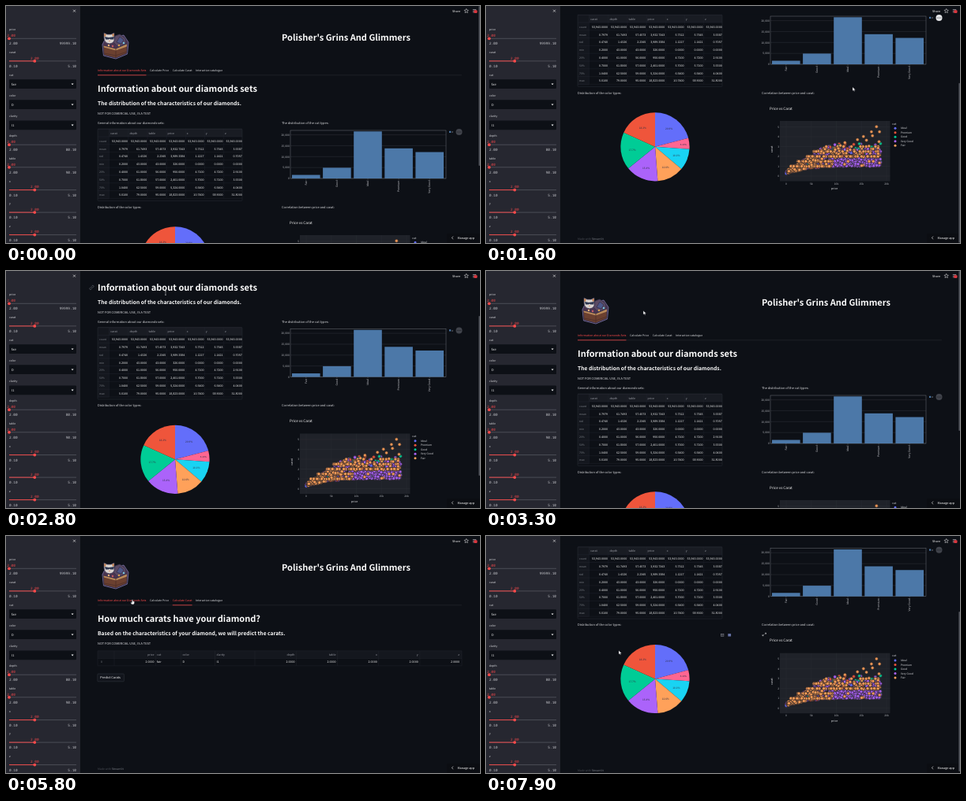
An HTML page for the animation above (8000 ms loop, 600x301 px).

```html
<!DOCTYPE html>
<html lang="en">
<head>
<meta charset="utf-8">
<title>Diamond dashboard</title>
<style>
html, body { margin: 0; width: 100%; height: 100%; overflow: hidden; background: #0d1016; }
svg { display: block; width: 600px; height: 301px; }
text { font-family: "Noto Sans CJK JP", "Noto Sans CJK SC", "Noto Sans CJK", "Open Sans", sans-serif; text-rendering: geometricPrecision; white-space: pre; }
.mono { font-family: "Noto Sans Mono", "DejaVu Sans Mono", monospace; }
</style>
</head>
<body>
<svg id="stage" viewBox="0 0 600 301"></svg>
<script>
const BG = '#0d1016', PANEL = '#262730', RED = '#ff4b4b', WHITE = '#fafafa', SOFT = '#dcdde0', DIM = '#7d8088', EDGE = '#2b2e36';
const stage = document.getElementById('stage');

// Markup helpers
const text = (x, y, s, size = 3.95, fill = SOFT, extra = '') =>
  `<text x="${x}" y="${y}" font-size="${size}" fill="${fill}" ${extra}>${s}</text>`;
const END = 'text-anchor="end"', MID = 'text-anchor="middle"', BOLD = 'font-weight="700"';
const rect = (x, y, w, h, fill, extra = '') =>
  `<rect x="${x}" y="${y}" width="${w}" height="${h}" fill="${fill}" ${extra}/>`;
const line = (x1, y1, x2, y2, color, w = .4) =>
  `<path d="M${x1} ${y1}L${x2} ${y2}" stroke="${color}" stroke-width="${w}"/>`;
const dot = (x, y, r, fill, extra = '') => `<circle cx="${x}" cy="${y}" r="${r}" fill="${fill}" ${extra}/>`;
const path = (d, fill, extra = '') => `<path d="${d}" fill="${fill}" ${extra}/>`;
const group = (id, body, extra = '') => `<g id="${id}" ${extra}>${body}</g>`;

function slider(y, label, value, pos, min, max) {
  const mono = (x, dy, s, fill, anchor = '') => text(x, y + dy, s, 4.45, fill, `class="mono" ${anchor}`);
  const x = 4 + 85 * pos;
  return text(4, y + 1.4, label, 3.5) +
    mono(Math.max(x, 6.6), 9, value, '#e5474a', MID) +
    line(4, y + 11.3, 89, y + 11.3, '#50525b', .9) + line(4, y + 11.3, x, y + 11.3, RED, .9) + dot(x, y + 11.3, 1.9, RED) +
    mono(4, 19.4, min, '#c3c4c9') + mono(89, 19.4, max, '#c3c4c9', END);
}

function select(y, label, value) {
  return text(4, y + 1.4, label, 3.5) + rect(4, y + 6, 85, 11.8, BG, 'rx="1.2"') +
    text(7, y + 13.4, value, 3.95, WHITE) + path(`M82.6 ${y + 11.2}h3l-1.5 1.8z`, WHITE);
}

function sidebar() {
  return rect(0, 0, 94, 301, PANEL) +
    path('M85 4.7l3 3m0-3l-3 3', 'none', 'stroke="#fafafa" stroke-width=".6"') +
    slider(30, 'price', '2.00', 0, '2.00', '99999.10') +
    slider(58.6, 'carat', '2.00', .38, '0.10', '5.10') +
    select(87.2, 'cut', 'fair') + select(113.3, 'color', 'D') + select(139.4, 'clarity', 'I1') +
    slider(164.9, 'depth', '2.00', 0, '2.00', '80.10') +
    slider(193.5, 'table', '2.00', 0, '2.00', '90.10') +
    ['x', 'y', 'z'].map((s, i) => slider(222.3 + 28.5 * i, s, '2.00', .38, '0.10', '5.10')).join('');
}

// A masked animal leaning over a treasure chest
function emblem() {
  const ink = 'stroke="#38334f" stroke-width=".8" stroke-linejoin="round"';
  return path('M122 49L125 43 149 37 155 46 153.500 61 139 67 123.500 63z', '#4a3550', 'stroke="#6b6592" stroke-width="1"') +
    path('M136 46l2-8 6-2 7 5 1 7-10 4z', '#5a4a63', ink) +
    path('M123 50l16 4 14-6v12l-14 6-15-4z', '#6b4030', ink) +
    path('M123.500 50.500l15.500 4 14-6v3l-14 5-15-4z', '#b98a5c') +
    path('M139 54v12M124 60l15 3 14-5', 'none', 'stroke="#4a2c28" stroke-width=".7"') +
    path('M124 40l0-6 4 2h5l4-2v7q1 6-6 7-7-1-7-8z', '#d9d3cf', ink) +
    path('M124 35l3 1-2 4zM137 35l-3 1 2 4z', '#c07a48') +
    path('M125 39l5 1 7-1-1 3.500-4 0-1-1-1 1-4 0z', '#2d3650') +
    dot(131, 44.500, .8, '#d88c6c') +
    path('M140 46l4-7 5 4-3 5z', '#4d5788', ink) +
    [[143, 50, '#d9a04a'], [149, 47, '#72c5de'], [130, 50, '#e5b27a'], [135, 51, '#c55d66']].map(g => dot(g[0], g[1], 1.2, g[2])).join('');
}

const tabs = [[116, 177.5, 'Information about our Diamonds Sets'], [182, 206.3, 'Calculate Price'],
  [210.8, 235.6, 'Calculate Carat'], [240, 274, 'Interactive catalogue']];

function masthead() {
  return emblem() + text(349, 43.5, "Polisher's Grins And Glimmers", 11, WHITE, BOLD) +
    line(116, 87.8, 577, 87.8, '#33363e', .4) +
    tabs.map((b, i) => text(b[0], 82.7, b[2], 3.5, SOFT, `id="tab${i}"`)).join('') +
    rect(116, 87.5, 61.5, .7, RED, 'id="marker"');
}

const intro = (title, sub) => text(116, 109, title, 11.02, WHITE, BOLD) + text(116, 126.4, sub, 6.73, WHITE, BOLD) +
  text(116, 138, 'NOT FOR COMERCIAL USE, IS A TEST', 4);
const footer = y => text(116, y, 'Made with <tspan fill="#7b7e86">Streamlit</tspan>', 3.5, '#4b4e56');

const stats = `count 53,943.0000 53,943.0000 53,943.0000 53,943.0000 53,943.0000 53,943.0000 53,943.0000
mean 0.7979 61.7493 57.4573 3,932.7343 5.7312 5.7345 3.5387
std 0.4740 1.4326 2.2345 3,989.3384 1.1217 1.1421 0.7057
min 0.2000 43.0000 43.0000 326.0000 0.0000 0.0000 0.0000
25% 0.4000 61.0000 56.0000 950.0000 4.7100 4.7200 2.9100
50% 0.7000 61.8000 57.0000 2,401.0000 5.7000 5.7100 3.5300
75% 1.0400 62.5000 59.0000 5,324.0000 6.5400 6.5400 4.0400
max 5.0100 79.0000 95.0000 18,823.0000 10.7400 58.9000 31.8000`;

function statsTable() {
  const step = 9.8, top = 156.2;
  let s = rect(116, top, 183, step, '#191c23') + rect(116, top, 14.5, 9 * step + 1, '#14171e');
  for (let i = 0; i <= 9; i++) s += line(116, top + i * step, 299, top + i * step, EDGE, .3);
  for (let i = 0; i < 7; i++) s += line(130.6 + 24.2 * i, top, 130.6 + 24.2 * i, top + 9 * step, EDGE, .3);
  s += rect(116, top, 183, 9 * step + 3, 'none', `rx="1" stroke="${EDGE}" stroke-width=".5"`);
  ['carat', 'depth', 'table', 'price', 'x', 'y', 'z'].forEach((h, i) => s += text(132.3 + 24.1 * i, 162.8, h, 3.6, '#9a9ca4'));
  stats.split('\n').forEach((row, r) => row.split(' ').forEach((v, c) =>
    s += text(c ? 130 + 24.1 * c : 118, 172.7 + step * r, v, c ? 3.65 : 3.4, c ? WHITE : DIM, c ? END : '')));
  return s;
}

function barChart() {
  const base = 219;
  let s = text(349, 150, 'The distribution of the cut types:');
  for (let i = 0; i < 5; i++) {
    const y = base - 13.85 * i;
    s += line(360, y, 557, y, '#3f424a', .35) + text(358.8, y + 1.2, i ? 5 * i + ',000' : '0', 3.4, '#b9bbc1', END);
  }
  s += rect(360, 158, 197, base - 158, 'none', 'stroke="#777a82" stroke-width=".45"');
  [['Fair', 1610], ['Good', 4906], ['Ideal', 21551], ['Premium', 13791], ['Very Good', 12082]].forEach(([name, n], i) => {
    const x = 362 + 39.1 * i, h = n * .00277;
    s += rect(x, base - h, 35.6, h, '#4c78a8') + line(x + 17.8, base, x + 17.8, base + 1.5, '#777a82') +
      text(0, 0, name, 3.4, '#c9cacf', `${END} transform="translate(${x + 19} ${base + 2.5}) rotate(-90)"`);
  });
  return s + rect(561, 158.8, 2.2, 2.2, '#4c78a8') + text(564.2, 161, 'n', 3, '#b9bbc1') +
    dot(573.5, 160, 4, '#40434b', 'id="menu"') + [571.7, 573.5, 575.3].map(x => dot(x, 160, .5, '#14161c')).join('');
}

function pieChart() {
  const parts = [[20.9, '#636efa'], [5.21, '#ff6692'], [10.1, '#19d3f3'], [12.6, '#ffa15a'], [15.4, '#ab63fa'], [17.7, '#00cc96'], [18.2, '#ef553b']];
  const total = parts.reduce((sum, p) => sum + p[0], 0), cx = 214, cy = 323.8, R = 43.6;
  const at = (f, r) => [cx + r * Math.sin(f * 2 * Math.PI), cy - r * Math.cos(f * 2 * Math.PI)];
  let f = 0, wedges = '', labels = '';
  for (const [n, color] of parts) {
    const g = f + n / total, [x, y] = at((f + g) / 2, n < 6 ? 36 : 29);
    wedges += path(`M${cx} ${cy}L${at(f, R)}A${R} ${R} 0 0 1 ${at(g, R)}z`, color);
    labels += text(x, y + 1.2, n + '%', n < 6 ? 2.8 : 3.2, '#303247', MID);
    f = g;
  }
  return text(116, 256.5, 'Distribution of the color types:') + wedges + labels;
}

function scatterPlot() {
  let seed = 11;
  const rnd = () => (seed = (seed * 16807) % 2147483647) / 2147483647;
  const cuts = [['Ideal', '#636efa'], ['Premium', '#ef553b'], ['Good', '#00cc96'], ['Very Good', '#ab63fa'], ['Fair', '#ffa15a']];
  const X = k => 380 + 6.35 * k, Y = c => 361 - 12.5 * c;
  const point = (k, c, i) => dot(X(k).toFixed(1), Y(c).toFixed(1), 2, cuts[i][1], 'fill-opacity=".9" stroke="#2a2528" stroke-width=".6"');
  const low = k => .25 + .85 * (1 - Math.exp(-k / 5)), high = k => Math.min(2.85, .5 + .33 * k);

  let s = text(349, 256.5, 'Correlation between price and carat:') + text(359, 276.8, 'Price vs Carat', 4.6, WHITE) +
    rect(372, 291, 139.5, 76.5, '#1f2229');
  for (let c = 0; c < 6; c++) s += line(372, Y(c), 511.5, Y(c), '#30333b', .3) + text(371, Y(c) + 1.2, c, 3.3, '#b9bbc1', END);
  for (let k = 0; k <= 20; k += 5) s += line(X(k), 291, X(k), 367.5, '#30333b', .3) + text(X(k), 371.6, k ? k + 'k' : 0, 3.3, '#b9bbc1', MID);

  for (let i = 0; i < 420; i++) {
    const k = 18.8 * rnd(), c = low(k) + (high(k) - low(k)) * rnd(), hue = rnd();
    s += point(k, c, hue < .1 ? 0 : hue < .2 ? 1 : hue < .3 ? 2 : 3);
  }
  for (let i = 0; i < 32; i++) s += point(8 + 10.8 * rnd(), 2.6 + .7 * rnd(), i % 3 + 1);
  for (let i = 0; i < 220; i++) s += point(9 + 9.8 * rnd(), 1 + .9 * rnd(), 3);
  // The top layer thins out towards high prices at low weight
  for (let i = 0; i < 480; i++) {
    const k = .4 + 18.4 * rnd() ** 1.5;
    let c = low(k) + (high(k) - low(k)) * rnd();
    if (rnd() < .55) c = Math.round(c * 2) / 2;
    if (k > 9 && c < 1.9 && rnd() < .8) continue;
    s += point(k, Math.max(low(k), c), 4);
  }
  [[18, 5.02], [17, 4.5], [18.6, 4.5], [15.4, 4.02], [17.2, 4.1], [14.2, 3.7], [16, 3.65], [18.5, 3.5],
    [11.7, 3.4], [10.8, 3.1], [16.5, 3.05], [14.8, 3], [17.8, 3], [13, 3]].forEach(p => s += point(p[0], p[1], 4));

  s += text(441, 378.4, 'price', 3.7, SOFT, MID) + text(0, 0, 'carat', 3.7, SOFT, `${MID} transform="translate(362.5 327) rotate(-90)"`) +
    text(514, 295.6, 'cut', 3.5);
  cuts.forEach(([name, color], i) => s += dot(518, 300.2 + 5.5 * i, 1.5, color) + text(525, 301.4 + 5.5 * i, name, 3.3));
  return s;
}

function overview() {
  return intro('Information about our diamonds sets', 'The distribution of the characteristics of our diamonds.') +
    text(116, 150, 'General information about our diamonds sets:') + statsTable() + barChart() + pieChart() + scatterPlot() + footer(441.5) +
    group('link', '<path d="M107.500 106.500l2-2m-2.300.6l-1 1a1.200 1.200 0 0 0 1.700 1.700l1-1m-.9-2.600l1-1a1.200 1.200 0 0 1 1.700 1.700l-1 1" fill="none" stroke="#777a82" stroke-width=".5"/>') +
    group('tools', rect(297.3, 266.8, 3.6, 2.7, 'none', 'stroke="#858891" stroke-width=".6"') + dot(299.1, 268.2, .6, '#858891') +
      rect(306.3, 266.4, 3.8, 3.4, '#6874a8') +
      path('M353 265.500h1.500v1.500m0-1.500l-1.700 1.700M351.500 269h-1.500v-1.500m0 1.500l1.700-1.700', 'none', 'stroke="#fafafa" stroke-width=".5"'));
}

function predictor(first, title, sub, button) {
  const cols = [[187.5, first, '2.0000'], [191, 'cut', 'fair'], [223.5, 'color', 'D'], [266.5, 'clarity', 'I1'],
    [365.5, 'depth', '2.0000'], [417.5, 'table', '2.0000'], [469.7, 'x', '2.0000'], [521.7, 'y', '2.0000'], [574, 'z', '2.0000']];
  let s = intro(title, sub) + rect(116, 145.8, 461, 9.6, '#14171e') + text(120, 161.3, '0', 3.5, DIM);
  [116, 137, 189.4, 221.3, 264.5, 315, 367.4, 419.5, 471.6, 523.8, 577].forEach(x => s += line(x, 145.8, x, 164.8, EDGE, .35));
  [145.8, 155.4, 164.8].forEach(y => s += line(116, y, 577, y, EDGE, .35));
  cols.forEach(([x, head, v], i) => {
    const anchor = i > 0 && i < 4 ? '' : END;
    s += text(x, 152, head, 3.6, '#9a9ca4', anchor) + text(x, 161.3, v, 3.65, WHITE, anchor);
  });
  return s + rect(115.8, 175, button.length > 13 ? 33.6 : 31.4, 9.8, '#12151c', 'rx="1" stroke="#41444c" stroke-width=".4"') +
    text(119.3, 181.4, button, 3.95, WHITE) + footer(296.8);
}

function chrome() {
  return rect(94, 0, 506, 10.5, BG) + text(565, 7.6, 'Share', 3.7, WHITE) +
    path('M582.700 3.500l.8 1.700 1.800.2-1.300 1.300.3 1.900-1.600-.9-1.600.9.3-1.900-1.300-1.300 1.800-.2z', 'none', 'stroke="#fafafa" stroke-width=".5"') +
    [4.5, 6.2, 7.9].map(y => line(590.8, y, 595.2, y, '#c9cacf', .6)).join('') + rect(592.3, 5.2, 4.2, 3.8, '#d9373f', 'rx="1"') +
    rect(558, 289, 42, 12, '#0b0d12') + path('M566 292.600l-1.600 1.800 1.600 1.800', 'none', 'stroke="#fafafa" stroke-width=".6"') +
    text(571.5, 295.8, 'Manage app', 3.8, WHITE) + rect(598.4, 0, 1.6, 203, '#50535b', 'rx=".8" id="thumb"');
}

const ink = 'stroke="#22252c" stroke-width=".3"';
const cursors = path('M0 0v4.800l1.200-1 .8 1.700.8-.4-.8-1.600h1.600z', '#fff', ink + ' id="arrow"') +
  path('M-.6-2q.6-.7 1.100 0v1.800l2 .5v2l-.8 1.500h-2.600l-1.300-2 .6-.6 1 .6z', '#fff', ink + ' id="hand"') +
  path('M-.9-2.500h1.800M0-2.500v5M-.9 2.500h1.800', 'none', 'stroke="#e6e6e6" stroke-width=".5" id="beam"');

stage.innerHTML = rect(0, 0, 600, 301, BG) +
  group('page', masthead() + group('view0', overview()) +
    group('view1', predictor('carat', 'How much can you sell your diamond?', 'Based on the characteristics of your diamond, we will predict the price you can sell it for.', 'Predict Price')) +
    group('view2', predictor('price', 'How much carats have your diamond?', 'Based on the characteristics of your diamond, we will predict the carats.', 'Predict Carats'))) +
  chrome() + sidebar() + group('pointer', cursors);

// Motion
const el = id => document.getElementById(id);
const show = (id, on) => el(id).setAttribute('visibility', on ? 'visible' : 'hidden');
const mix = (a, b, p) => a + (b - a) * p;

function track(keys, t) {
  let i = 0;
  while (i < keys.length - 2 && t >= keys[i + 1][0]) i++;
  const a = keys[i], b = keys[i + 1], p = Math.min(1, Math.max(0, (t - a[0]) / (b[0] - a[0])));
  return a.slice(1).map((v, n) => mix(v, b[n + 1], p * p * (3 - 2 * p)));
}

const scrolls = [[500, 0], [1500, 145], [2300, 145], [2800, 84.5], [2900, 84.5], [3300, 0], [7300, 0], [7900, 142.3]];
const moves = [[100, 300, 95], [900, 464, 103], [1800, 464, 103], [2600, 202, 28], [2900, 202, 28], [3800, 195, 82], [4100, 195, 82],
  [4200, 217, 81], [4500, 222, 82], [5300, 222, 82], [5700, 160, 83], [6200, 160, 83], [7000, 162, 140], [7300, 162, 140], [7700, 168, 145.5]];
const clicks = [[0, 0], [4100, 1], [4500, 2], [6200, 0]];

function draw(t) {
  const [scroll] = track(scrolls, t), [x, y] = track(moves, t);
  const n = clicks.filter(c => c[0] <= t).length - 1, active = clicks[n][1];
  const from = tabs[n ? clicks[n - 1][1] : 0], to = tabs[active];
  const q = 1 - Math.min(1, (t - clicks[n][0]) / 200), p = 1 - q * q;
  const left = mix(from[0], to[0], p), right = mix(from[1], to[1], p);
  el('marker').setAttribute('x', left);
  el('marker').setAttribute('width', right - left);
  const onTabs = t >= 100 && scroll < 1 && y > 76 && y < 88;
  tabs.forEach((b, i) => el('tab' + i).setAttribute('fill',
    i === active || onTabs && x >= b[0] && x <= b[1] ? RED : SOFT));
  for (let i = 0; i < 3; i++) show('view' + i, i === active);

  el('page').setAttribute('transform', `translate(0 ${-scroll})`);
  el('thumb').setAttribute('y', scroll * 301 / 446);
  show('thumb', active === 0);
  show('link', active === 0 && t >= 2600 && t < 3000);
  show('tools', t >= 7600);
  el('menu').setAttribute('fill', t >= 1100 && t < 1900 ? '#e4e5e8' : '#40434b');

  const beam = t >= 2600 && t < 3000 || t >= 6700 && t < 7400;
  el('pointer').setAttribute('transform', `translate(${x} ${y})`);
  show('hand', onTabs);
  show('beam', beam && !onTabs);
  show('arrow', t >= 100 && !beam && !onTabs);
}

const start = performance.now();
function tick() {
  draw(Math.floor((performance.now() - start) % 8000 / 100) * 100);
  requestAnimationFrame(tick);
}
tick();
</script>
</body>
</html>
```
